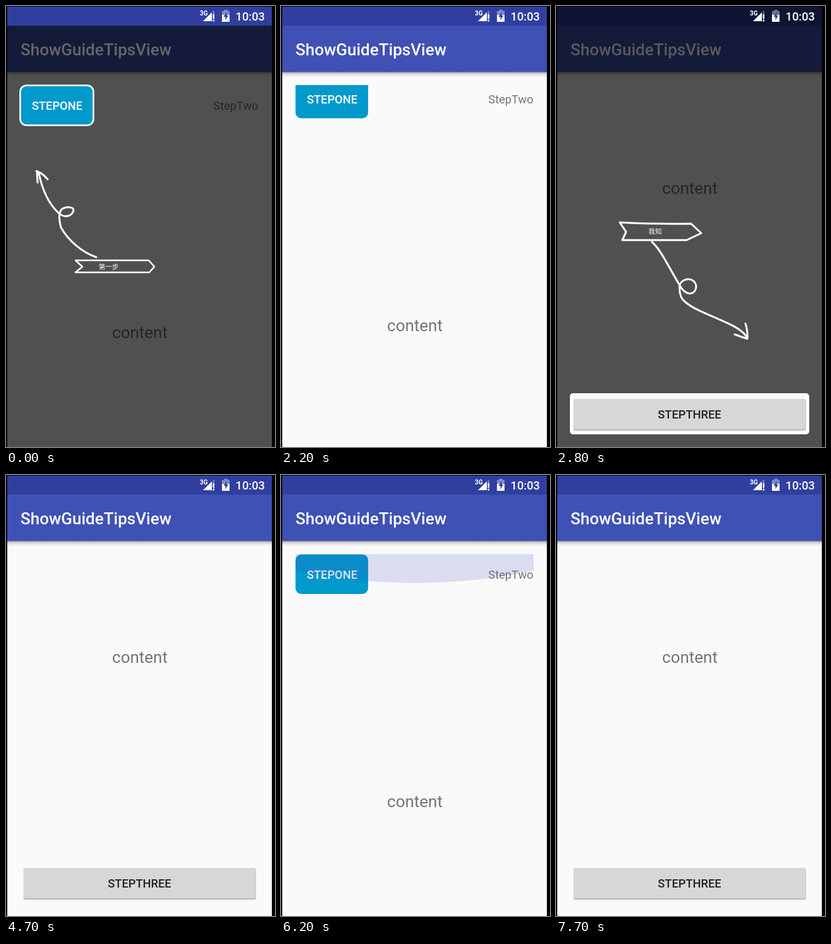
Write an HTML page that moves like this. It is 426 px wide and 697 px high and loops after 8000 ms.

```html
<!DOCTYPE html>
<html lang="en">
<head>
<meta charset="utf-8">
<title>Guide tips</title>
<style>
  html, body { margin: 0; width: 100%; height: 100%; overflow: hidden; background: #000; }
  svg { display: block; width: 100%; height: 100%; }
  text { font-family: Roboto, "Open Sans", sans-serif; font-size: 18.3px; }
  .medium { font-weight: 500; }
  .large { font-size: 26px; }
  .middle { text-anchor: middle; }
  .gray { fill: #757575; }
  .dim { fill: #000; fill-opacity: .68; fill-rule: evenodd; }
  .sketch { fill: none; stroke: #fff; stroke-width: 3; stroke-linecap: round; stroke-linejoin: round; }
  .note { font: 10.5px "Noto Sans CJK SC", "Noto Sans CJK", sans-serif; fill: #fff; text-anchor: middle; }
</style>
</head>
<body>
<svg viewBox="0 0 426 697">
  <defs>
    <linearGradient id="shade" x2="0" y2="1">
      <stop stop-color="#000" stop-opacity=".34"/>
      <stop offset=".4" stop-color="#000" stop-opacity=".12"/>
      <stop offset="1" stop-color="#000" stop-opacity="0"/>
    </linearGradient>
    <clipPath id="viewport"><rect x="23" y="125" width="377" height="551"/></clipPath>
    <clipPath id="screen"><rect x="2" y="1" width="419" height="696"/></clipPath>
  </defs>

  <g clip-path="url(#screen)">
    <rect width="426" height="697" fill="#fafafa"/>
    <rect width="426" height="31" fill="#303f9f"/>
    <rect y="31" width="426" height="73.5" fill="#3f51b5"/>
    <rect y="104.5" width="426" height="8" fill="url(#shade)"/>

    <g clip-path="url(#viewport)">
      <g id="page">
        <rect x="23" y="125.5" width="115" height="62.5" rx="9" fill="#0099cc"/>
        <text class="medium middle" x="81" y="164" fill="#fff">STEPONE</text>
        <text class="gray middle" x="364" y="164">StepTwo</text>
        <text class="gray large middle" x="212" y="524.5">content</text>
        <rect x="27.5" y="850" width="368.5" height="50" rx="2.5" fill="#000" opacity=".1"/>
        <rect x="28" y="850" width="367.5" height="48.5" rx="2" fill="#000" opacity=".2"/>
        <rect x="28" y="849" width="367" height="48" rx="2" fill="#d6d7d7"/>
        <text class="medium middle" x="211.5" y="880" fill="#212121">STEPTHREE</text>
      </g>
      <ellipse id="glow" cx="212" rx="565" fill="#3f51b5"/>
    </g>

    <g class="tip">
      <path class="dim" d="M0 31H426V697H0Z M32 125H129a10 10 0 0 1 10 10V178a10 10 0 0 1 -10 10H32a10 10 0 0 1 -10 -10V135a10 10 0 0 1 10 -10Z"/>
      <rect x="22.5" y="125.5" width="116" height="63" rx="10" class="sketch" style="stroke-width:2.6"/>
      <path class="sketch" d="M50 279 49 261 M48 261C56 263 61 268 66 274 M52 264C56 284 64 309 83 327C94 337 105 331 107 323C107 317 96 317 90 320C82 325 84 338 87 350C99 371 120 389 143 397"/>
      <path class="sketch" style="stroke-width:2.5" d="M110 402H226L235 412 227 421H110L121 412Z"/>
      <text class="note" x="162.5" y="415.5">第一步</text>
    </g>

    <g class="tip">
      <path class="dim" d="M0 0H426V697H0Z M327 156a37 37 0 1 0 74 0a37 37 0 1 0 -74 0Z"/>
      <rect x="23" y="125.5" width="115" height="62.5" rx="9" fill="#004d67"/>
      <text class="medium middle" x="81" y="164" fill="#949494">STEPONE</text>
      <path class="sketch" d="M181 397C185 376 201 351 216 328C228 312 240 304 251 309C260 314 251 328 241 328C234 320 239 293 255 273C269 263 290 260 301 242 M274 248C284 243 293 240 302 239C303 249 300 260 298 268"/>
      <path class="sketch" d="M114 406 225 408Q238 415 247 423Q232 438 212 442L110 441Q117 435 123 427Z"/>
      <text class="note" x="178.5" y="428">第二步</text>
    </g>

    <g class="tip">
      <path class="dim" d="M0 0H426V697H0Z M27 612H396a5 5 0 0 1 5 5V672a5 5 0 0 1 -5 5H27a5 5 0 0 1 -5 -5V617a5 5 0 0 1 5 -5Z"/>
      <rect x="24" y="614" width="375" height="61" rx="4" class="sketch" style="stroke-width:4"/>
      <path class="sketch" d="M152 373C166 385 177 410 195 440C205 459 220 458 222 444C221 428 201 429 196 440C195 449 196 462 205 468C229 489 292 501 303 525 M300 502Q304 514 303 526Q293 523 283 519"/>
      <path class="sketch" d="M101 342Q154 345 214 344L230 359 207 370H105L111 357Z"/>
      <text class="note" x="157" y="360">我知</text>
    </g>

    <text id="title" class="medium large" x="23" y="77.5">ShowGuideTipsView</text>

    <g fill="#fff">
      <text class="medium" x="363.5" y="23">10:03</text>
      <text x="307" y="14.5" style="font-size:10px;font-weight:700">3G</text>
      <path d="M312 24 326 10V24Z"/>
      <path d="M327.5 8H330V24H327.5Z" opacity=".35"/>
      <path d="M327.5 13H330V20H327.5Z M327.5 22H330V24.5H327.5Z"/>
      <path d="M345 6H351V8H354V14H342V8H345Z" opacity=".4"/>
      <path d="M342 14H354V25H342Z"/>
      <path d="M349.5 9.5 344.5 17H347.5V22.5L352 15H349.5Z" fill="#303f9f"/>
    </g>
  </g>
</svg>
<script>
  const LOOP = 8000, STEP = 100, MAX_SCROLL = 228;
  const byId = id => document.getElementById(id);
  const page = byId('page'), glow = byId('glow'), title = byId('title');
  const tips = [...document.querySelectorAll('.tip')];

  const tipTimes = [[0, 500], [500, 2200], [2800, 4700]];
  const titleColors = ['#666', '#949494', '#5a5a5a'];

  // Each gesture moves the page in 100 ms steps and rests at its last offset.
  const gestures = [
    { start: 2200, offsets: [10.5, 72, 145, 205, MAX_SCROLL] },
    { start: 5500, offsets: [223, 207, 132, 65, 0] },
    { start: 6900, offsets: [65, 160, 207, MAX_SCROLL] }
  ];
  // Overscroll glow: [vertical scale, opacity] per step.
  const glowStart = 5900;
  const glowSteps = [[.4, .1], [.75, .2], [.7, .19], [.6, .17], [.36, .04]];

  function scrollAt(t) {
    const g = gestures.filter(g => t >= g.start).pop();
    if (!g) return 0;
    return g.offsets[Math.min(g.offsets.length - 1, (t - g.start) / STEP)];
  }

  function draw(now) {
    const t = Math.floor(now % LOOP / STEP) * STEP;
    page.setAttribute('transform', `translate(0 ${-scrollAt(t)})`);

    const [scale, alpha] = glowSteps[(t - glowStart) / STEP] || [0, 0];
    const depth = 76 * scale, radius = 565 * scale;
    glow.setAttribute('ry', radius);
    glow.setAttribute('cy', 125 + depth - radius);
    glow.setAttribute('opacity', alpha);

    const active = tipTimes.findIndex(([from, to]) => t >= from && t < to);
    tips.forEach((tip, i) => tip.setAttribute('display', i === active ? 'inline' : 'none'));
    title.setAttribute('fill', titleColors[active] || '#fff');
  }

  const origin = performance.now();
  function tick() {
    draw(performance.now() - origin);
    requestAnimationFrame(tick);
  }
  tick();
</script>
</body>
</html>
```
